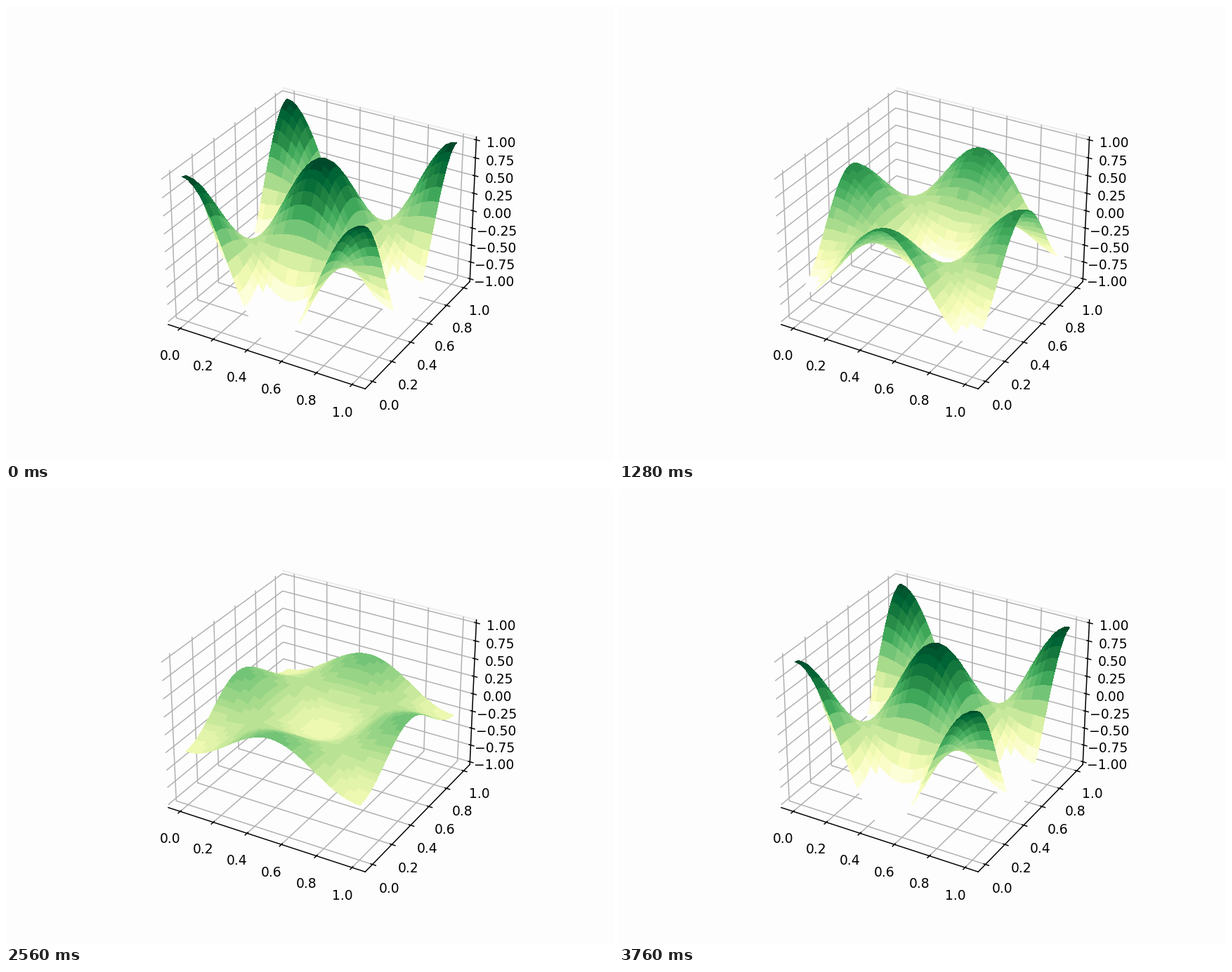
These frames come from a looping animation (864 by 648 pixels, 3840 ms). A matplotlib script:

```python
import numpy as np
import matplotlib.pyplot as plt
from matplotlib.animation import FuncAnimation
from matplotlib.colors import ListedColormap

FRAMES, INTERVAL = 48, 80
CELLS = 32
PAPER = "#fdfdfd"

# Phase advance per frame: leapfrog wave equation with dt = h / 2
STEP = 2 * np.arcsin(np.sqrt(0.5) * np.sin(np.pi / CELLS))


def banded_greens(bands=23.5):
    """YlGn reduced to flat bands, the lowest one fading into the paper."""
    level = np.rint(np.linspace(0, 1, 1024) * bands)
    colors = plt.get_cmap("YlGn")(np.minimum(level / bands, 1))
    colors[level == 0] = plt.matplotlib.colors.to_rgba(PAPER)
    return ListedColormap(colors).with_extremes(under=PAPER)


def padded(low, high, share=1 / 48):
    pad = (high - low) * share
    return low - pad, high + pad


plt.rcParams.update({"font.family": "DejaVu Sans",
                     "figure.facecolor": PAPER,
                     "axes.facecolor": PAPER})
fig = plt.figure(figsize=(6.4, 4.8), dpi=135)
ax = fig.add_subplot(projection="3d")

ax.set_xticks(np.linspace(0, 1, 6))
ax.set_yticks(np.linspace(0, 1, 6))
ax.set_zticks(np.linspace(-1, 1, 9))
ax.set_xlim(*padded(-0.05, 1.05))
ax.set_ylim(*padded(-0.05, 1.05))
ax.set_zlim(*padded(-1, 1))

for axis, edge in ((ax.xaxis, PAPER), (ax.yaxis, "#ececec"), (ax.zaxis, PAPER)):
    axis.pane.set(facecolor=PAPER, edgecolor=edge, alpha=1)

side = np.linspace(0, 1, CELLS + 1)
X, Y = np.meshgrid(side, side)
MODE = np.cos(2 * np.pi * X) * np.cos(2 * np.pi * Y)
GREENS = banded_greens()


def draw(frame):
    for old in list(ax.collections):
        old.remove()
    surface = ax.plot_surface(X, Y, MODE * np.cos(STEP * frame), cmap=GREENS,
                              vmin=-0.5, vmax=1, linewidth=0, antialiased=False)
    return [surface]


anim = FuncAnimation(fig, draw, frames=FRAMES, interval=INTERVAL,
                     repeat=True, repeat_delay=0)
plt.show()
```
